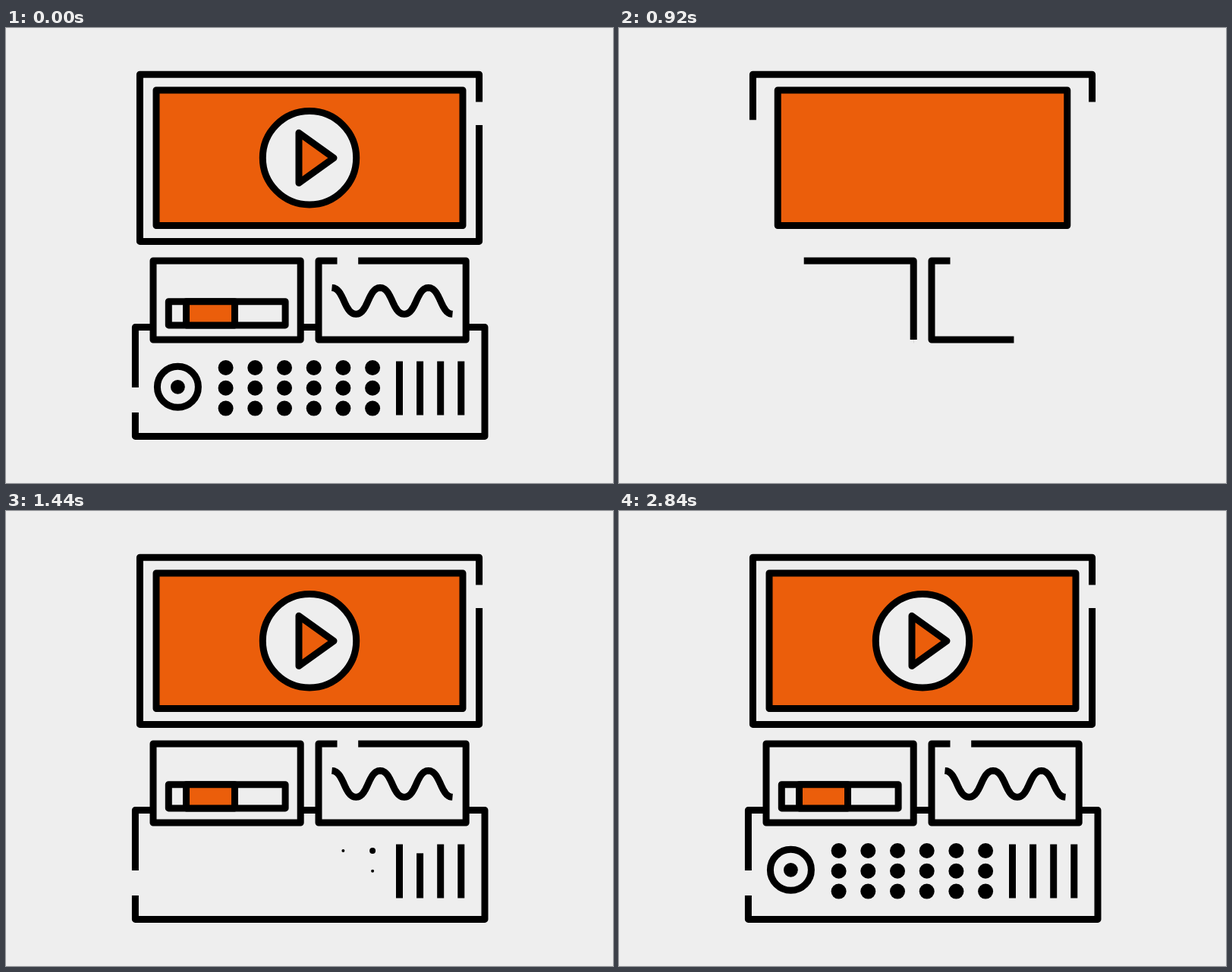
An HTML page with a canvas for the animation above (2880 ms loop, 800 px wide and 600 px high).

```html
<!DOCTYPE html>
<html lang="en">
<head>
<meta charset="utf-8">
<title>Media console</title>
<style>
html, body { margin: 0; width: 100%; height: 100%; overflow: hidden; background: #eee; }
canvas { display: block; }
</style>
</head>
<body>
<canvas id="stage" width="800" height="600"></canvas>
<script>
const ctx = document.getElementById('stage').getContext('2d');
const LOOP = 2880, FRAME = 40, INTRO_AT = 720;
const PAPER = '#eee', ORANGE = '#eb5e0b', INK = '#000';

const clamp = v => Math.max(0, Math.min(1, v));
const progress = (time, start, duration) => clamp((time - start) / duration);
const easeInOut = p => p < .5 ? 2 * p * p : 1 - 2 * (1 - p) ** 2;

// Grows past full size, then settles back to 1.
function pop(time, start) {
  const rise = progress(time, start, 160);
  return rise < 1 ? rise * 1.16 : 1.16 - .16 * progress(time, start + 160, 200);
}

function paint(path, fill) {
  if (fill) {
    ctx.fillStyle = fill;
    ctx.fill(path);
  }
  ctx.stroke(path);
}

function polyline(points, closed) {
  const path = new Path2D();
  points.forEach(([x, y]) => path.lineTo(x, y));
  if (closed) path.closePath();
  const ends = closed ? [...points, points[0]] : points;
  let length = 0;
  for (let i = 1; i < ends.length; i++) {
    length += Math.hypot(ends[i][0] - ends[i - 1][0], ends[i][1] - ends[i - 1][1]);
  }
  return { path, length };
}

function trace({ path, length }, p) {
  if (p <= 0) return;
  if (p < 1) ctx.setLineDash([length * p, length * 2]);
  ctx.stroke(path);
  ctx.setLineDash([]);
}

function rect(x, y, w, h, fill) {
  const path = new Path2D();
  path.rect(x, y, w, h);
  paint(path, fill);
}

function disc(x, y, r, fill, outlined) {
  if (r <= 0) return;
  const path = new Path2D();
  path.arc(x, y, r, 0, Math.PI * 2);
  ctx.fillStyle = fill;
  ctx.fill(path);
  if (outlined) ctx.stroke(path);
}

const screenFrame = polyline([[623.6, 97.5], [623.6, 61.3], [176.4, 61.3], [176.4, 281.4], [623.6, 281.4], [623.6, 128]]);
const leftPanel = polyline([[388.2, 411], [388.2, 307], [194, 307], [194, 411]], true);
const rightPanel = polyline([[436.5, 307], [412, 307], [412, 411], [606.2, 411], [606.2, 307], [464.2, 307]]);
const consoleBox = polyline([[170.4, 507], [170.4, 538.4], [631, 538.4], [631, 394.5], [170.4, 394.5], [170.4, 474]]);

// The wave runs from right to left through alternating crests and troughs.
const wavePoints = [];
const HALF_WAVE = 31.8;
for (let i = 0; i < 5; i++) {
  const x = 588.5 - i * HALF_WAVE, from = i % 2 ? 342.5 : 377.3, to = i % 2 ? 377.3 : 342.5;
  for (let k = i ? 1 : 0; k <= 24; k++) {
    const s = k / 24, r = 1 - s;
    wavePoints.push([
      x - HALF_WAVE * (1.5 * r * r * s + 1.5 * r * s * s + s ** 3),
      from + (to - from) * (3 * s * s - 2 * s ** 3)
    ]);
  }
}
const wave = polyline(wavePoints);

function drawScreen(time) {
  trace(screenFrame, progress(time, 0, 480));
  const open = easeInOut(progress(time, 0, 240));
  if (open > 0) rect(400 - 202 * open, 82, 404 * open, 178.6, ORANGE);

  disc(400, 171.2, 61.7 * pop(time, 200), PAPER, true);
  const size = progress(time, 280, 160);
  if (size > 0) {
    const corners = [[-14, -33], [32, 0], [-14, 33]].map(([x, y]) => [400 + x * size, 171.3 + y * size]);
    paint(polyline(corners, true).path, ORANGE);
  }
}

function drawProgressBar(time) {
  const open = progress(time, 240, 160);
  if (open > 0) rect(214.3, 360.7, 153.8 * open, 31.2);
  const filled = progress(time, 320, 160);
  if (filled > 0) rect(237.5, 360.7, 64 * filled, 31.2, ORANGE);
}

function drawPanels(time) {
  const drawn = progress(time, 0, 480);
  ctx.fillStyle = PAPER;
  ctx.fill(leftPanel.path);
  ctx.fill(rightPanel.path);
  trace(leftPanel, drawn);
  trace(rightPanel, drawn);
  drawProgressBar(time);
  trace(wave, progress(time, 240, 480));
}

function drawControls(time) {
  for (let col = 0; col < 6; col++) {
    for (let row = 0; row < 3; row++) {
      const grown = progress(time, 640 + 40 * (col + row), 200);
      disc(483.1 - 38.7 * col, 448 + 26.8 * row, 10 * grown, INK);
    }
  }
  for (let i = 0; i < 4; i++) {
    const height = 71 * progress(time, i === 1 ? 520 : 480, 240);
    ctx.fillStyle = INK;
    ctx.fillRect(514 + 27.1 * i, 510.5 - height, 9, height);
  }
  const dial = pop(time, 880);
  disc(226.4, 473.3, 27 * dial, PAPER, true);
  disc(226.4, 473.3, 9.4 * dial, INK);
}

function render() {
  const now = Math.floor(performance.now() / FRAME) * FRAME;
  const time = (now + LOOP - INTRO_AT) % LOOP;
  ctx.fillStyle = PAPER;
  ctx.fillRect(0, 0, 800, 600);
  ctx.strokeStyle = INK;
  ctx.lineWidth = 9;
  ctx.lineJoin = 'round';
  drawScreen(time);
  trace(consoleBox, progress(time, 240, 480));
  drawPanels(time);
  drawControls(time);
  requestAnimationFrame(render);
}
render();
</script>
</body>
</html>
```
